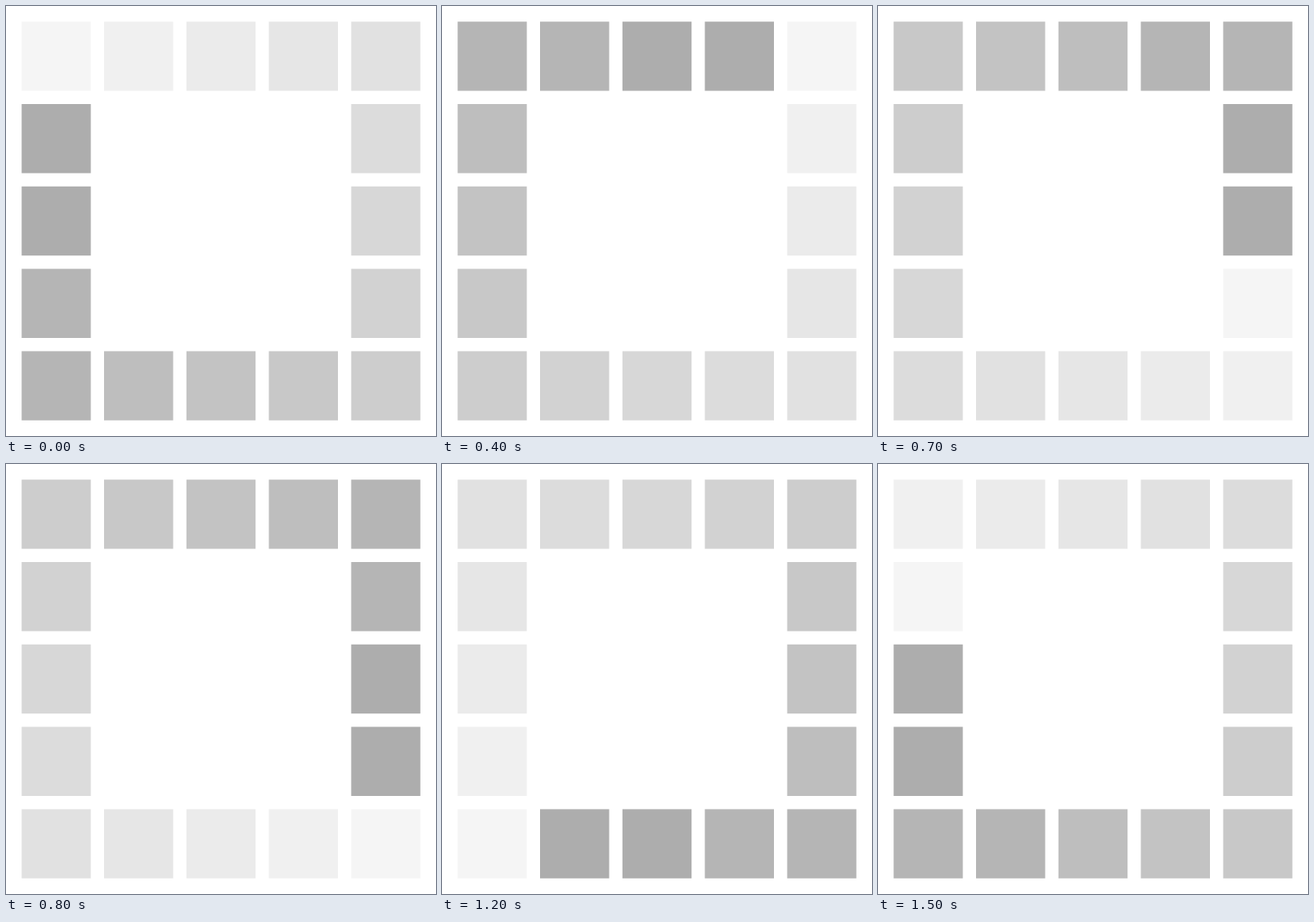
These frames come from a looping animation (500x500 px, 1.6 s). An HTML page with a canvas:

```html
<!DOCTYPE html>
<html lang="en">
<head>
<meta charset="utf-8">
<title>Square loader</title>
<style>
  html, body { margin: 0; width: 100%; height: 100%; overflow: hidden; background: #fff; }
  canvas { display: block; }
</style>
</head>
<body>
<canvas id="stage" width="500" height="500"></canvas>
<script>
const ctx = document.getElementById('stage').getContext('2d');
const COUNT = 16, STEP_MS = 100;
const START = 18.2, PITCH = 95.8, SIZE = 80.4;

// The four darkest squares share two tones.
const shade = i => i < 12 ? 245 - 5 * i : i < 14 ? 181 : 173;

// Column and row of a square, counted clockwise from the top left.
function cell(i) {
  const side = Math.floor(i / 4), along = i % 4;
  return [[along, 0], [4, along], [4 - along, 4], [0, 4 - along]][side];
}

function draw(time) {
  const head = Math.floor(time / STEP_MS) % COUNT;
  ctx.fillStyle = '#fff';
  ctx.fillRect(0, 0, 500, 500);
  for (let i = 0; i < COUNT; i++) {
    const [col, row] = cell(i);
    const v = shade((i - head + COUNT) % COUNT);
    ctx.fillStyle = `rgb(${v},${v},${v})`;
    ctx.fillRect(START + col * PITCH, START + row * PITCH, SIZE, SIZE);
  }
}

const begin = performance.now();
function tick() {
  draw(performance.now() - begin);
  requestAnimationFrame(tick);
}
tick();
</script>
</body>
</html>
```
